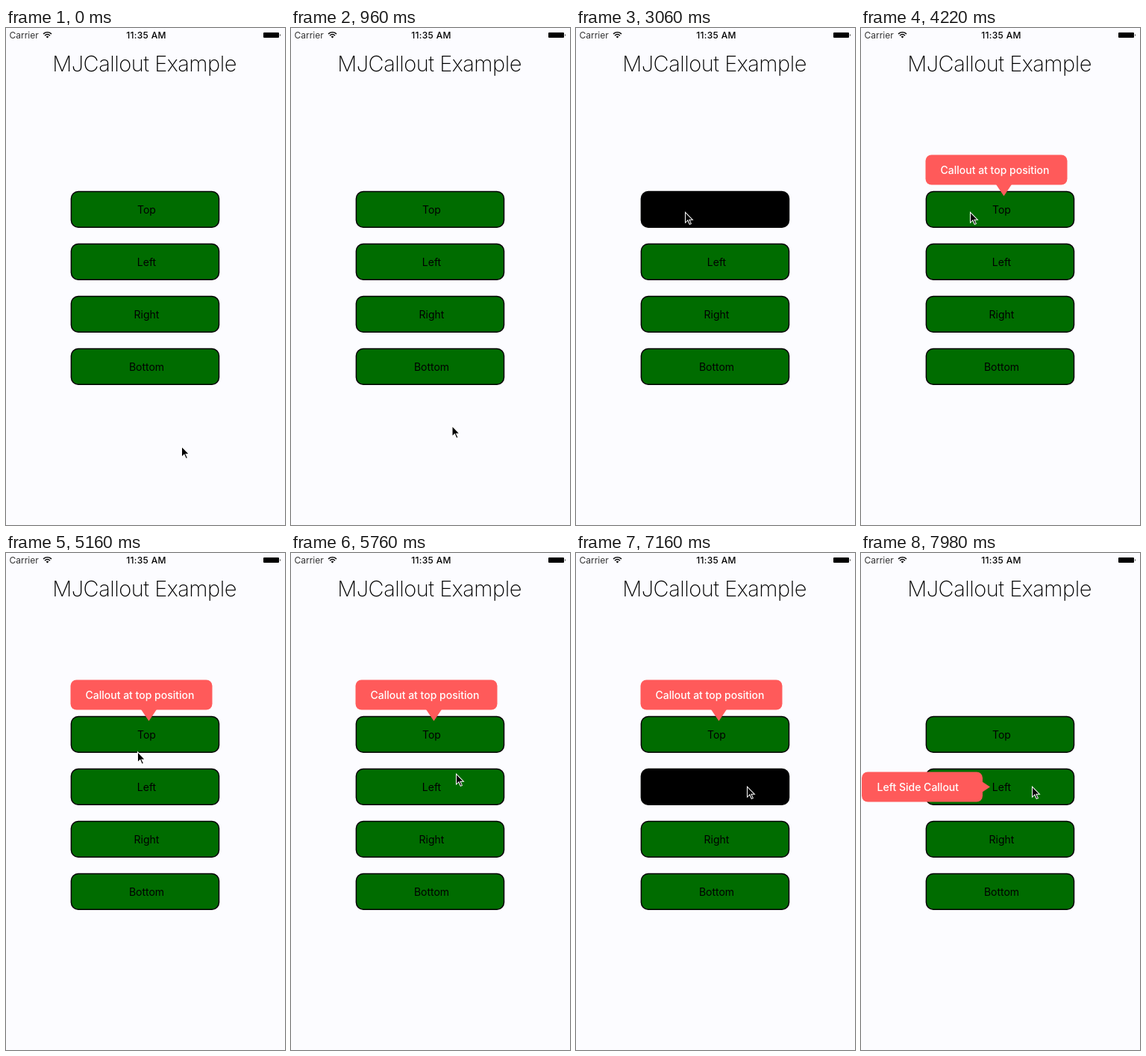
Animation, 374 px wide and 664 px high, one loop 8000 ms. Source, as an HTML page:

```html
<!DOCTYPE html>
<html lang="en">
<head>
<meta charset="utf-8">
<title>Callout demo</title>
<style>
  html, body { margin: 0; width: 100%; height: 100%; overflow: hidden; background: #fcfcff; }
  svg { display: block; width: 374px; height: 664px; font: 14px Inter, Roboto, sans-serif; }
  .middle { text-anchor: middle; }
  .title { font-size: 29px; font-weight: 250; letter-spacing: -.5px; }
  .carrier { font-size: 12px; fill: #333; }
  .clock { font-size: 12px; font-weight: 500; letter-spacing: .3px; }
  .button rect { fill: #006c00; stroke: #000; stroke-width: 1.5; }
  .pressed rect { fill: #000; }
  .callout { fill: #ff5a5a; }
  .callout text { fill: #fff; font-weight: 500; }
</style>
</head>
<body>
<svg viewBox="0 0 374 664">
  <rect width="374" height="664" fill="#fcfcff"/>
  <text class="carrier" x="4.5" y="13.6">Carrier</text>
  <g fill="none" stroke="#000" stroke-width="1.4">
    <path d="M50 7.9Q55.5 3.3 61 7.9M52 10.1Q55.5 7.1 59 10.1"/>
    <path d="M53.6 11.5Q55.5 9.9 57.4 11.5L55.5 13.4Z" fill="#000" stroke="none"/>
  </g>
  <text class="clock middle" x="188" y="13.6">11:35 AM</text>
  <rect x="345" y="6" width="21" height="7" rx="1"/>
  <path d="M367.2 7.8Q369 9.5 367.2 11.2Z"/>
  <text class="title middle" x="185.6" y="57.8">MJCallout Example</text>

  <g id="buttons"></g>

  <g class="callout" id="topCallout">
    <rect x="86.5" y="169.5" width="190" height="40" rx="8"/>
    <path d="M181 209H202L191.5 224.5Z"/>
    <text x="106.5" y="194.6">Callout at top position</text>
  </g>
  <g class="callout" id="leftCallout">
    <rect x="1" y="292.5" width="162" height="40" rx="8"/>
    <path d="M162.5 305.5V319.5L173 312.5Z"/>
    <text x="21.5" y="317.6">Left Side Callout</text>
  </g>

  <g id="cursor">
    <path d="M0 0V16.2L3.6 12.8L6 18L9 16.8L6.8 11.8H11.6Z" fill="#fff"/>
    <path d="M1 2.4V13.9L4 11L6.6 16.8L7.8 16.2L5.2 10.8H9.2Z"/>
  </g>
</svg>
<script>
const LOOP = 8000;
const TOP_PRESS = [2960, 3140];
const LEFT_PRESS = [7100, 7260];

// Pointer stops: time, x, y
const stops = [
  [0, 235, 558], [300, 235, 558], [800, 236, 566], [1560, 59, 260],
  [1660, 56, 248], [1840, 89, 234], [2400, 146, 245], [4750, 146, 245],
  [5700, 221, 294], [6000, 221, 294], [6600, 229, 311], [LOOP, 229, 311]
];

const byId = id => document.getElementById(id);
const within = (t, [start, end]) => t >= start && t < end;
const ease = u => u * u * (3 - 2 * u);
const show = (id, visible) => byId(id).setAttribute('visibility', visible ? 'visible' : 'hidden');

byId('buttons').innerHTML = ['Top', 'Left', 'Right', 'Bottom'].map((label, i) => `
  <g class="button" id="button${label}" transform="translate(0 ${i * 70})">
    <rect x="87.4" y="218.4" width="198.1" height="47.9" rx="9.5"/>
    <text class="middle" x="188.5" y="247.9">${label}</text>
  </g>`).join('');

function pointerAt(t) {
  const i = stops.findIndex(stop => stop[0] > t);
  const [t0, x0, y0] = stops[i - 1];
  const [t1, x1, y1] = stops[i];
  const u = ease((t - t0) / (t1 - t0));
  return [x0 + (x1 - x0) * u, y0 + (y1 - y0) * u];
}

function draw(now) {
  const t = now % LOOP;
  byId('cursor').setAttribute('transform', `translate(${pointerAt(t)})`);
  byId('buttonTop').classList.toggle('pressed', within(t, TOP_PRESS));
  byId('buttonLeft').classList.toggle('pressed', within(t, LEFT_PRESS));
  show('topCallout', within(t, [TOP_PRESS[1], LEFT_PRESS[1]]));
  show('leftCallout', t >= LEFT_PRESS[1]);
}

const began = performance.now();
function tick() {
  draw(performance.now() - began);
  requestAnimationFrame(tick);
}
tick();
</script>
</body>
</html>
```
